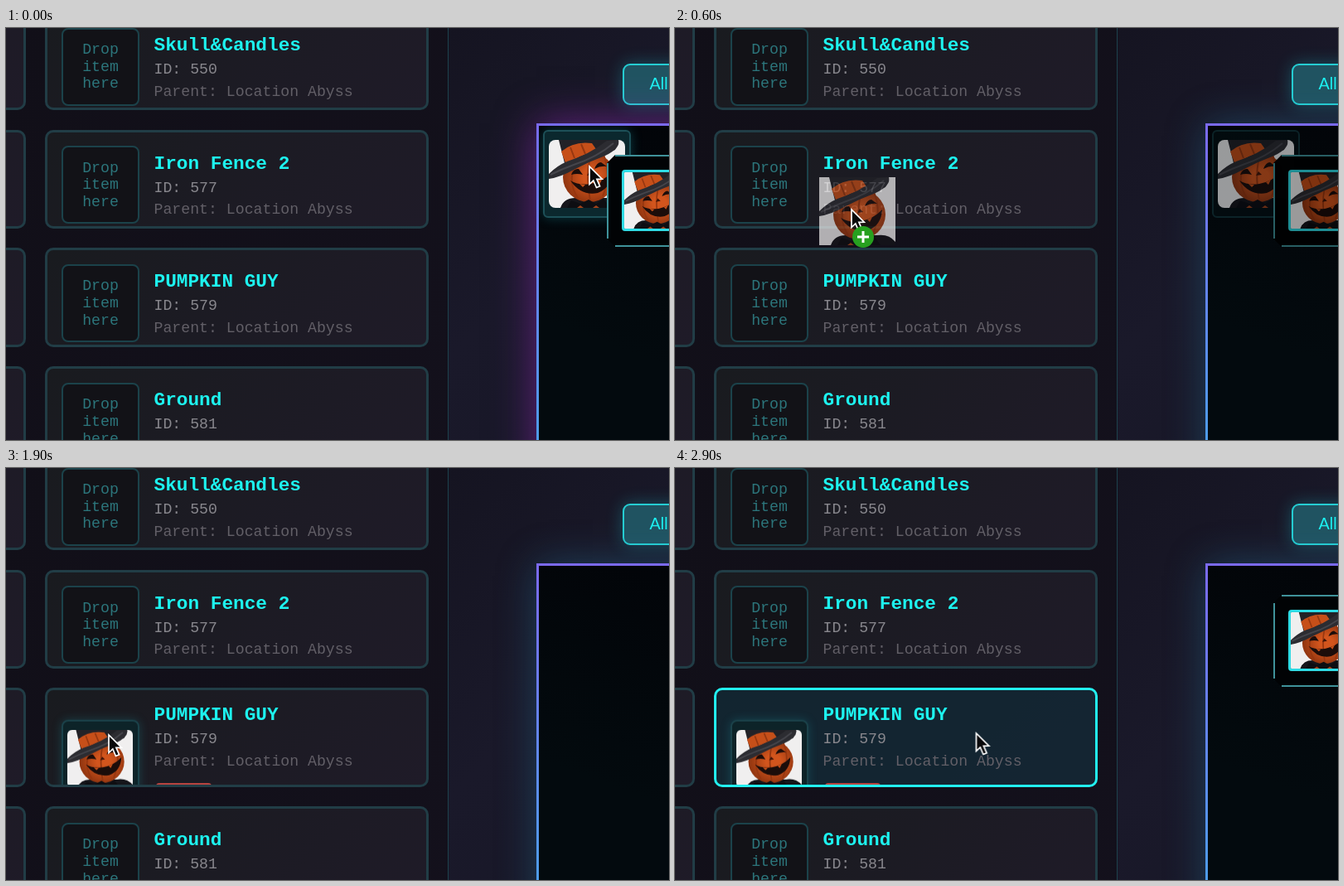
These frames come from a looping animation (800 by 497 pixels, 3 s). An HTML page:

```html
<!DOCTYPE html>
<html lang="en">
<head>
<meta charset="utf-8">
<title>Drag item to slot</title>
<style>
html, body { margin: 0; width: 100%; height: 100%; overflow: hidden; background: #120f1a; }
#stage {
  position: relative; width: 800px; height: 497px; overflow: hidden;
  background: linear-gradient(120deg, #110f18, #14111d);
}
#stage * { position: absolute; box-sizing: border-box; }
#stage svg * { position: static; }

.card {
  left: 47px; width: 463px; height: 119.5px; overflow: hidden;
  border: 3px solid #213d46; border-radius: 10px;
  background: linear-gradient(135deg, #191b1f, #1f1b28);
  font-family: "Courier New", "Liberation Mono", monospace;
  font-size: 18.2px; line-height: 26px; white-space: pre;
}
.side { left: -439px; }
.info { left: 128.5px; top: 25.2px; }
.info b { font-size: 22.75px; color: #1df3ef; }
.info .id { top: 29px; color: #88878d; }
.info .parent { top: 55.7px; color: #625f67; }
.slot {
  left: 17px; top: 16.7px; width: 94px; height: 94px;
  border: 2px solid #1b424a; border-radius: 8px; background: #121217;
}
.label { left: 0; right: 0; top: 14.4px; line-height: 20.7px; text-align: center; color: #2c757b; }
.slot svg { left: 5px; top: 10px; width: 79px; height: 70px; border-radius: 6px; opacity: 0; }
.remove {
  left: 131px; top: 112px; width: 67px; height: 30px; opacity: 0;
  border: 2px solid #b8443f; border-radius: 4px;
}

#right {
  left: 533px; top: 0; width: 300px; height: 497px;
  border-left: 1.5px solid #1d424d;
  background: linear-gradient(135deg, #151421, #1a192a 50%, #171727);
}
#all {
  left: 744px; top: 43px; width: 85px; height: 49.5px; padding-left: 30.5px;
  border: 2px solid #25cdd2; border-radius: 9px; background: #205361;
  box-shadow: 0 0 20px rgba(30, 200, 215, .32);
  font: 20px/44px Arial, "Liberation Sans", sans-serif; color: #1cf0f0;
}
#panel {
  left: 640px; top: 115px; width: 400px; height: 700px;
  background: linear-gradient(#7b69ee, #4d9ce8 385px);
  animation: glow 3s linear infinite;
}
#panel i { inset: 3px; background: linear-gradient(200deg, #020307, #030a0e 45%, #030a0e); }

#tile {
  left: 648px; top: 122.5px; width: 106px; height: 106px;
  border: 2px solid #1d5058; border-radius: 6px; background: #0b282e;
  box-shadow: 0 0 14px rgba(30, 170, 185, .3);
  animation: tile 3s linear infinite;
}
#tile svg { left: 5px; top: 10.5px; width: 92px; height: 82px; border-radius: 8px; }

#tip { left: 722px; top: 153px; width: 130px; height: 111px; animation: tip 3s linear infinite; }
#tip .fill { inset: 0; background: #010305; clip-path: polygon(10px 0, 100% 0, 100% 100%, 10px 100%, 0 101px, 0 10px); }
#tip .edge {
  inset: 0; border: 2px solid #3f929a;
  clip-path: polygon(10px 0, 100% 0, 100% 100%, 10px 100%, 10px 101px, 0 101px, 0 10px, 10px 10px);
}
#tip svg { left: 18px; top: 18px; width: 82px; height: 74px; border: 3px solid #2fdbe4; border-radius: 4px; }

#ghost { left: 0; top: 0; width: 92px; height: 82px; opacity: 0; animation: ghost 3s step-end infinite; }
#cursor { left: 0; top: 0; width: 40px; height: 50px; overflow: visible; animation: cursor 3s step-end infinite; }
#badge { animation: badge 3s step-end infinite; }

.target { animation: hover 3s linear infinite; }
.target .info { animation: lift 3s step-end infinite; }
.target .slot { animation: filled 3s step-end infinite; }
.target .label { animation: leave 3s step-end infinite; }
.target .slot svg, .target .remove { animation: enter 3s step-end infinite; }

@keyframes glow {
  0%, 3.3% { box-shadow: 0 0 46px rgba(160, 40, 200, .55); }
  12%, 99.9% { box-shadow: 0 0 44px rgba(40, 135, 180, .35); }
  100% { box-shadow: 0 0 46px rgba(160, 40, 200, .55); }
}
@keyframes tile {
  0%, 6% { opacity: 1; }
  13.3% { opacity: .85; background: #091d21; box-shadow: 0 0 10px rgba(30, 170, 185, .15); }
  20% { opacity: .64; background: #040f12; border-color: #12343a; box-shadow: none; }
  26.6%, 99.9% { opacity: 0; }
  100% { opacity: 1; }
}
/* The tip darkens before it vanishes, so the tile never shows through. */
@keyframes tip {
  0%, 3.3% { opacity: 1; filter: none; transform: translateX(3px); }
  6.6% { filter: brightness(1); transform: none; }
  13.3% { filter: brightness(.92); }
  20% { opacity: 1; filter: brightness(.65); }
  26.6%, 83.3% { opacity: 0; filter: none; }
  93.3%, 99.9% { opacity: 1; transform: none; }
  100% { opacity: 1; transform: translateX(3px); }
}
@keyframes ghost {
  0% { opacity: 0; transform: translate(655px, 135px); }
  3.33% { opacity: .72; transform: translate(645px, 133px); }
  6.66% { opacity: .72; transform: translate(552px, 113px); }
  10% { opacity: .72; transform: translate(424px, 98px); }
  13.33% { opacity: .72; transform: translate(322px, 100px); }
  16.66% { opacity: .72; transform: translate(245px, 136px); }
  20% { opacity: .72; transform: translate(174px, 180px); }
  23.33% { opacity: .72; transform: translate(121px, 230px); }
  26.66% { opacity: .72; transform: translate(88px, 273px); }
  30% { opacity: .72; transform: translate(78px, 287px); }
  33.33% { opacity: .72; transform: translate(77px, 290px); }
  40%, 100% { opacity: 0; }
}
@keyframes cursor {
  0% { transform: translate(704px, 167px); }
  3.33% { transform: translate(690px, 163px); }
  6.66% { transform: translate(590px, 142px); }
  10% { transform: translate(462px, 130px); }
  13.33% { transform: translate(362px, 131px); }
  16.66% { transform: translate(283px, 170px); }
  20% { transform: translate(213px, 219px); }
  23.33% { transform: translate(160px, 268px); }
  26.66% { transform: translate(132px, 306px); }
  30% { transform: translate(126px, 317px); }
  33.33% { transform: translate(125px, 321px); }
  40% { transform: translate(124px, 322px); }
  83.33% { transform: translate(140px, 322px); }
  86.66% { transform: translate(205px, 321px); }
  90% { transform: translate(285px, 320px); }
  93.33% { transform: translate(345px, 320px); }
  96.66%, 100% { transform: translate(363.5px, 320px); }
}
@keyframes badge { 0%, 40%, 100% { opacity: 0; } 3.33% { opacity: 1; } }
@keyframes lift { 0% { transform: none; } 63.33%, 100% { transform: translateY(-8px); } }
@keyframes filled {
  0% { transform: none; }
  63.33%, 100% { transform: translateY(18.7px); background: #0d2328; box-shadow: 0 0 12px rgba(30, 170, 185, .25); }
}
@keyframes leave { 0% { opacity: 1; } 63.33%, 100% { opacity: 0; } }
@keyframes enter { 0% { opacity: 0; } 63.33%, 100% { opacity: 1; } }
@keyframes hover {
  0%, 81.6% { border-color: #213d46; box-shadow: inset 0 0 0 120px rgba(17, 40, 54, 0); }
  90%, 99.9% { border-color: #22f0f0; box-shadow: inset 0 0 0 120px rgba(17, 40, 54, .75); }
  100% { border-color: #213d46; box-shadow: inset 0 0 0 120px rgba(17, 40, 54, 0); }
}
</style>
</head>
<body>
<svg width="0" height="0" style="position:absolute">
  <radialGradient id="skin" cx=".55" cy=".5" r=".55">
    <stop offset=".3" stop-color="#d2551d"/>
    <stop offset="1" stop-color="#8f340f"/>
  </radialGradient>
  <symbol id="pumpkin" viewBox="0 0 92 82" preserveAspectRatio="xMidYMid slice">
    <rect width="92" height="82" fill="#f0efef"/>
    <path d="M14 82Q18 70 32 70H70Q84 68 92 78V82Z" fill="#15151a"/>
    <ellipse cx="48.5" cy="45" rx="31.5" ry="30" fill="url(#skin)"/>
    <path d="M32 30Q22 50 35 70M49 25Q45 45 50 74M66 18Q76 42 65 68" fill="none" stroke="#97360f" stroke-width="2"/>
    <path d="M12 0H84L80 12L20 32Z" fill="#222227"/>
    <path d="M15 14Q30 1 52 4L59 14Q38 17 21 30Z" fill="#c64f19"/>
    <path d="M26 9L31 22M39 5L44 17" stroke="#963710" stroke-width="2"/>
    <path d="M0 41Q10 31 22 26Q48 18 70 1L84 0Q87 10 68 19Q49 26 30 36Q14 45 0 47Z" fill="#2c2c31"/>
    <path d="M2 42Q16 35 30 30Q58 21 78 4" fill="none" stroke="#45454b" stroke-width="2"/>
    <path d="M27 42Q30 34 36 35L41 42Q34 40 27 42ZM55 35Q58 27 63 27L70 32Q62 31 55 35Z" fill="#1c0d0a"/>
    <path d="M46 43L49 38L53 42Z" fill="#421609"/>
    <path d="M26 49Q36 55 50 53Q66 50 76 39Q75 58 59 64Q39 68 26 49Z" fill="#1c0d0a"/>
    <path d="M37 53L41 57L44 54ZM58 51L61 54L64 48Z" fill="#c64f19"/>
    <path d="M22 82L27 73L38 77L48 72L57 77L66 71L74 82Z" fill="#0e0e12"/>
    <path d="M34 82L38 79L42 82ZM53 82L57 79L61 82Z" fill="#a2431a"/>
  </symbol>
</svg>

<div id="stage">
  <div id="right"></div>
  <div id="all">All</div>
  <div id="panel"><i></i></div>
  <div id="tile"><svg><use href="#pumpkin"/></svg></div>
  <div id="tip">
    <div class="fill"></div><div class="edge"></div>
    <svg><use href="#pumpkin"/></svg>
  </div>
  <div id="cards"></div>
  <svg id="ghost"><use href="#pumpkin"/></svg>
  <svg id="cursor">
    <path d="M0 0V21.5L4.8 17L8.5 25.5L12.6 23.8L8.9 15.4L15.3 15.2Z" fill="#08080a" stroke="#fff" stroke-width="1.7"/>
    <g id="badge">
      <circle cx="14" cy="33" r="13" fill="#27a01f"/>
      <path d="M7 33H21M14 26V40" stroke="#fff" stroke-width="3"/>
    </g>
  </svg>
</div>

<script>
const items = [["Skull&amp;Candles", 550], ["Iron Fence 2", 577], ["PUMPKIN GUY", 579], ["Ground", 581]];
const target = 579;

document.getElementById("cards").innerHTML = items.map(([name, id], row) => {
  const top = `style="top:${-20.2 + row * 142.75}px"`;
  const hit = id === target;
  return `<div class="card side" ${top}></div>
    <div class="card ${hit ? "target" : ""}" ${top}>
      <div class="slot"><div class="label">Drop\nitem\nhere</div>${hit ? '<svg><use href="#pumpkin"/></svg>' : ""}</div>
      <div class="info"><b>${name}</b><span class="id">ID: ${id}</span><span class="parent">Parent: Location Abyss</span></div>
      ${hit ? '<div class="remove"></div>' : ""}
    </div>`;
}).join("");
</script>
</body>
</html>
```
